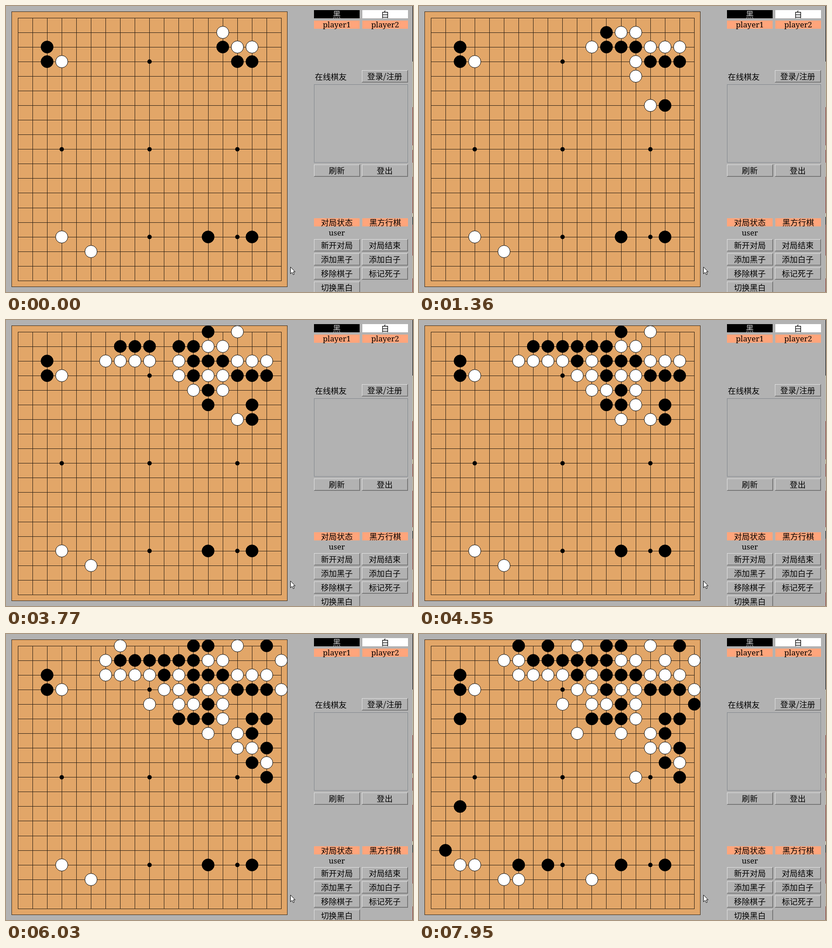
An HTML page with a canvas that plays this animation: 892 by 628 pixels, repeating every 8000 ms.

```html
<!DOCTYPE html>
<html lang="zh">
<head>
<meta charset="utf-8">
<title>围棋对局</title>
<style>
  html, body { margin: 0; width: 100%; height: 100%; overflow: hidden; background: #b2b2b2; }
  canvas { display: block; }
</style>
</head>
<body>
<canvas id="stage" width="892" height="628"></canvas>
<script>
const ctx = document.getElementById('stage').getContext('2d');
const LOOP = 8000;
const CJK = '17.4px "Noto Sans CJK SC", "Noto Sans CJK", "Noto Sans CJK JP", sans-serif';
const LATIN = '17px "Noto Serif", serif';
const SALMON = '#ffa57b';

// Points are letter pairs: column, then row, counted from the top left.
const SETUP = { black: 'cc cd oc pd qd np qp', white: 'ob pc qc dd dp fq' };

// Each run: first time, last time, steps. A step may hold two moves; white begins, colours alternate.
const RUNS = [
  [300, 1220, 'od ncrc rd oe qg nbmb lc mc'],
  [1360, 1360, 'pg'],
  [1610, 1850, 'qf ld lb'],
  [2160, 2290, 'jc jb'],
  [2560, 2680, 'icna paib'],
  [2950, 3070, 'hc hb'],
  [3350, 3770, 'gc mdnd ne menf'],
  [3890, 4280, 'of kckd kb ngmf'],
  [4430, 4980, 'le lf jera sb sc'],
  [5250, 5400, 'qhrh riqi'],
  [5520, 6150, 'phrj sd rf gbma ha ia'],
  [6300, 6700, 'ka ga fb pb'],
  [6850, 7240, 'qb se kgcf ojbo'],
  [7390, 7950, 'cp cl lq gp gqip']
];
const CAPTURES = { sd: 'sc', ga: 'ha', qb: 'pb' };

const moves = [];
for (const [start, end, text] of RUNS) {
  const steps = text.split(' ');
  steps.forEach((step, i) => {
    const at = start + (end - start) * i / Math.max(1, steps.length - 1);
    for (const point of step.match(/../g)) {
      moves.push({ at, point, color: moves.length % 2 ? 'black' : 'white' });
    }
  });
}

function stonesAt(t) {
  const stones = new Map();
  for (const color in SETUP) SETUP[color].split(' ').forEach(p => stones.set(p, color));
  for (const { at, point, color } of moves) {
    if (t < at - 0.5) break;
    stones.set(point, color);
    stones.delete(CAPTURES[point]);
  }
  return stones;
}

function box(x, y, w, h, color) {
  ctx.fillStyle = color;
  ctx.fillRect(x, y, w, h);
}

function disc(x, y, r, fill, stroke) {
  ctx.beginPath();
  ctx.arc(x, y, r, 0, Math.PI * 2);
  ctx.fillStyle = fill;
  ctx.fill();
  if (stroke) {
    ctx.strokeStyle = stroke;
    ctx.lineWidth = 1;
    ctx.stroke();
  }
}

function label(text, x, y, color = '#000', font = CJK, align = 'center') {
  ctx.font = font;
  ctx.textAlign = align;
  ctx.textBaseline = 'alphabetic';
  ctx.fillStyle = color;
  ctx.fillText(text, x, y + (font === LATIN ? 5 : 6.5));
}

function button(text, x, y) {
  box(x, y, 101, 27, '#696969');
  box(x, y, 100, 26, '#e3e3e3');
  box(x + 1, y + 1, 99, 25, '#8a8a8a');
  box(x + 1, y + 1, 98, 24, '#b2b2b2');
  label(text, x + 50, y + 13.5);
}

const pos = i => 25.9 + 32.08 * i;
const linePos = i => Math.floor(26 + 32.08 * i);

function drawBoard() {
  box(12, 12, 605, 605, '#e2a668');
  ctx.strokeStyle = '#3a2a1a';
  ctx.lineWidth = 1;
  ctx.strokeRect(12.5, 12.5, 604, 604);
  for (let i = 0; i < 19; i++) {
    box(linePos(i), 26, 1, 578, '#2b1f13');
    box(26, linePos(i), 578, 1, '#2b1f13');
  }
  for (const i of [3, 9, 15]) {
    for (const j of [3, 9, 15]) disc(pos(i), pos(j), 4.8, '#000');
  }
}

function drawPanel() {
  box(675, 9, 100, 18, '#000');
  label('黑', 725, 18, '#c8c8c8');
  box(781, 9, 100, 18, '#fff');
  label('白', 831, 18);
  box(675, 32, 100, 18, SALMON);
  label('player1', 725, 42, '#000', LATIN);
  box(781, 32, 100, 18, SALMON);
  label('player2', 831, 42, '#000', LATIN);

  label('在线棋友', 677, 155, '#000', CJK, 'left');
  ctx.strokeStyle = '#82878d';
  ctx.lineWidth = 1;
  ctx.strokeRect(675.5, 172.5, 205, 171);

  box(675, 466, 100, 18, SALMON);
  label('对局状态', 725, 475);
  box(781, 466, 100, 18, SALMON);
  label('黑方行棋', 831, 475);
  label('user', 725, 499, '#000', LATIN);

  button('登录/注册', 780, 141);
  button('刷新', 675, 348);
  button('登出', 780, 348);
  const rows = [['新开对局', '对局结束'], ['添加黑子', '添加白子'], ['移除棋子', '标记死子'], ['切换黑白']];
  rows.forEach((row, r) => row.forEach((text, c) => button(text, 675 + 105 * c, 512 + 31 * r)));
}

function drawEdge() {
  const bands = [[0, '#000'], [122, '#c3c4a8'], [222, '#8c2a20'], [306, '#d8c890'], [316, '#8c2a20'],
    [344, '#c3b59a'], [375, '#8c2a20'], [455, '#e0d8b0'], [463, '#000'], [480, '#8c2a20'],
    [548, '#c3b59a'], [598, '#8c2a20']];
  for (const [y, color] of bands) box(891, y, 1, 628 - y, color);
}

function drawCursor() {
  const outline = [[0, 0], [0, 15], [3.5, 11.8], [6, 17], [8.3, 16], [6, 10.8], [10.3, 10.8]];
  ctx.beginPath();
  outline.forEach(([x, y]) => ctx.lineTo(623.5 + x, 573 + y));
  ctx.closePath();
  ctx.fillStyle = '#fff';
  ctx.fill();
  ctx.strokeStyle = '#000';
  ctx.lineWidth = 1;
  ctx.stroke();
}

function draw(t) {
  box(0, 0, 892, 628, '#b2b2b2');
  drawBoard();
  for (const [point, color] of stonesAt(t)) {
    const [x, y] = [...point].map(ch => pos(ch.charCodeAt(0) - 97));
    disc(x, y, 13.4, color, '#000');
  }
  drawPanel();
  drawEdge();
  drawCursor();
}

const begin = performance.now();
function tick() {
  draw((performance.now() - begin) % LOOP);
  requestAnimationFrame(tick);
}
tick();
</script>
</body>
</html>
```
